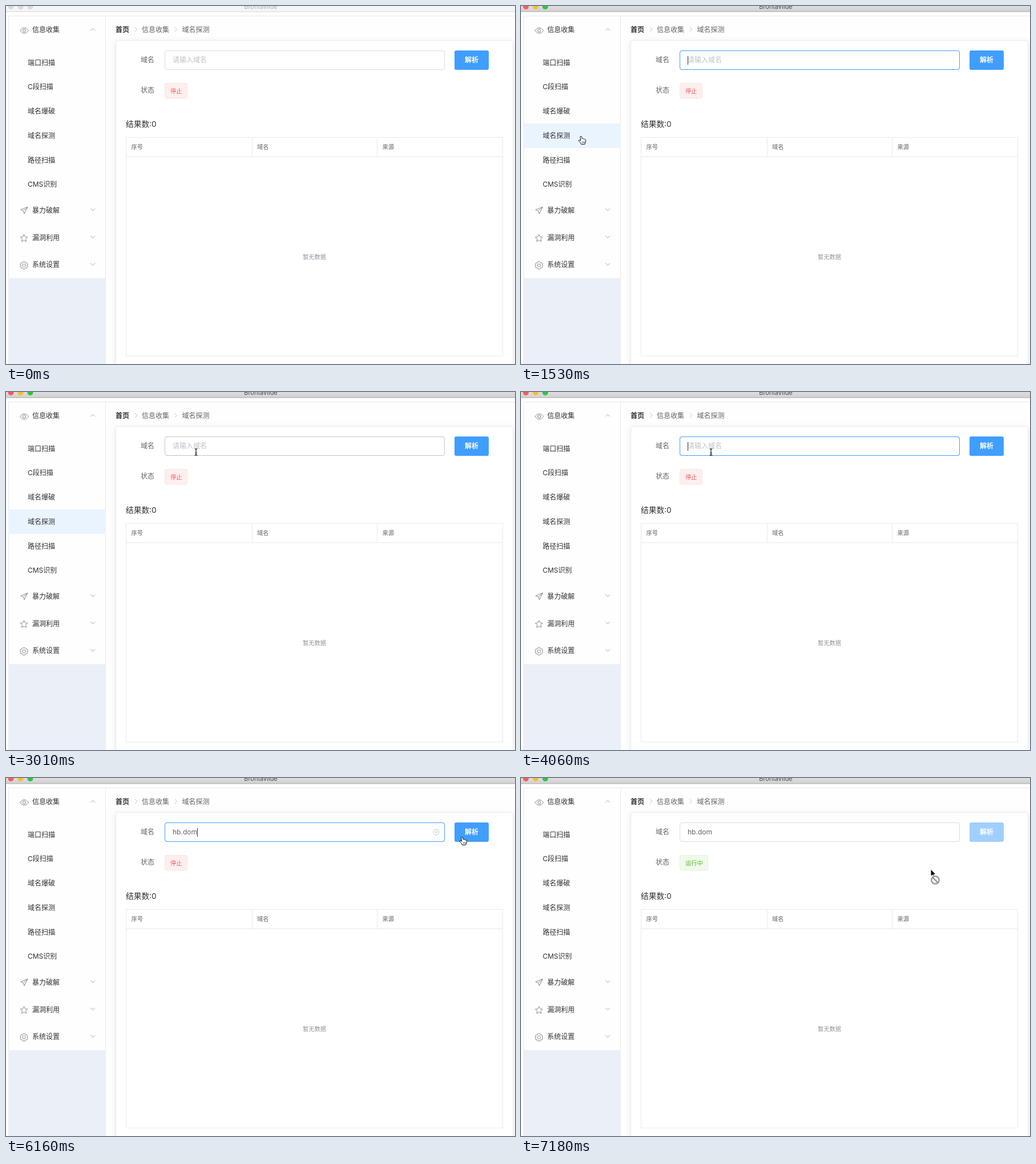
These frames come from a looping animation (892 px wide and 628 px high, 8000 ms). An HTML page:

```html
<!DOCTYPE html>
<html lang="zh-CN">
<head>
<meta charset="utf-8">
<title>域名探测</title>
<style>
html, body { margin: 0; width: 100%; height: 100%; overflow: hidden; background: #fefefe; }
svg { display: block; width: 892px; height: 628px; }
text { font: 12px Inter, "Noto Sans CJK SC", "Noto Sans CJK", sans-serif; fill: #303133; white-space: pre; }
.soft { fill: #606266; }
.bold { font-weight: 700; }
.small { font-size: 10.28px; fill: #909399; }
.mid { text-anchor: middle; }
.line { fill: none; stroke: #e6e9f0; }
.icon { fill: none; stroke: #85888e; stroke-linejoin: round; }
.chev { fill: none; stroke: #a9acb3; }
.card { fill: #fff; stroke: #e8ebf2; filter: drop-shadow(0 2px 5px rgba(0, 0, 0, .09)); }
.cursor { visibility: hidden; }
</style>
</head>
<body>
<svg viewBox="0 0 892 628">
  <defs>
    <linearGradient id="barFill" x2="0" y2="1"><stop stop-color="#dedede"/><stop offset="1" stop-color="#d0d0d0"/></linearGradient>
    <path id="arrow" d="M0 0V12.5L2.9 9.9 4.9 14.2 7 13.3 5.1 9.1H9Z" fill="#000" stroke="#fff"/>
  </defs>
  <rect width="892" height="628" fill="#fefefe"/>

  <!-- window bar -->
  <rect id="bar" width="892" height="10"/>
  <path id="barLine" d="M0 9.9H892"/>
  <g id="lights"><circle cx="8.5" cy="1" r="5"/><circle cx="25.5" cy="1" r="5"/><circle cx="42.5" cy="1" r="5"/></g>
  <text id="title" class="mid" x="446.5" y="5" style="font-size:11px">Brontavilde</text>

  <!-- side menu -->
  <path class="line" d="M4.5 478V17.5H892M174.5 17.5V478"/>
  <rect x="4" y="477.5" width="171" height="151" fill="#ebeff8"/>
  <rect id="hover" x="4" y="206" width="171" height="43" fill="#eaf4fe"/>
  <g class="icon">
    <path d="M24.5 43Q28 38 32 38T39.500 43Q36 48 32 48T24.500 43Z"/><circle cx="32" cy="43" r="2.6"/>
    <path d="M38 352.500 25.500 357.500 30.500 359.500 32 364.500ZM30.500 359.500 38 352.500"/>
    <path transform="translate(31.500 407)" d="M0-6.300 2-2.200 6.500-1.600 3.200 1.500 4 6 0 3.900-4 6-3.200 1.500-6.500-1.600-2-2.200Z"/>
    <path transform="translate(31.500 455)" d="M-2-6.300H2L3.200-4.300 5.300-4.200 6.700-1.300 5.600 0 6.700 1.300 5.300 4.200 3.200 4.300 2 6.300H-2L-3.200 4.300-5.300 4.200-6.700 1.300-5.600 0-6.700-1.300-5.300-4.200-3.200-4.300Z"/>
    <circle cx="31.500" cy="455" r="2.700"/>
  </g>
  <path class="chev" d="M148 43.200 152 39.200 156 43.200M148 355 152 359 156 355M148 403 152 407 156 403M148 451 152 455 156 451"/>
  <text x="46" y="46.300">信息收集</text>
  <text x="38" y="103.500">端口扫描</text>
  <text x="38" y="146.300">C段扫描</text>
  <text x="38" y="189">域名爆破</text>
  <text x="38" y="231.700">域名探测</text>
  <text x="38" y="274.500">路径扫描</text>
  <text x="38" y="317.300">CMS识别</text>
  <text x="46" y="362.500">暴力破解</text>
  <text x="46" y="410.500">漏洞利用</text>
  <text x="46" y="458.300">系统设置</text>

  <!-- breadcrumb -->
  <text class="bold" x="192" y="45.500">首页</text>
  <text class="soft" x="238" y="45.500">信息收集</text>
  <text class="soft" x="308.500" y="45.500">域名探测</text>
  <path class="chev" d="M226 37 230 41 226 45M295.500 37 299.500 41 295.500 45" style="stroke:#c0c4cc"/>

  <!-- form -->
  <rect class="card" x="192.500" y="60.500" width="696" height="600" rx="4"/>
  <text class="soft" x="236" y="99.300">域名</text>
  <text class="soft" x="236" y="152.300">状态</text>
  <rect id="field" x="278.500" y="78.500" width="490" height="33" rx="3.500" fill="#fff"/>
  <rect id="focus" x="278.500" y="78.500" width="490" height="33" rx="3.500" fill="none" stroke="#409eff"/>
  <text id="hint" x="292" y="99.300" style="fill:#bcc0c8">请输入域名</text>
  <text id="value" class="soft" x="292" y="99.300"></text>
  <rect id="caret" y="88" width="1" height="15" fill="#333"/>
  <path id="clear" class="chev" d="M749 95a5 5 0 1 0 10 0a5 5 0 1 0-10 0M752.200 93.200 755.800 96.800M755.800 93.200 752.200 96.800" style="stroke:#bfc3cb"/>
  <rect id="button" x="786" y="78" width="60" height="34" rx="3"/>
  <text class="bold mid" x="816" y="99.300" style="fill:#fff">解析</text>
  <rect id="tag" x="278.500" y="135.500" height="26.500" rx="3"/>
  <text id="state" class="small" x="288" y="152.500"></text>

  <!-- results -->
  <text x="210" y="212" style="font-size:13.710px">结果数:0</text>
  <path class="line" d="M210.500 230.500H870.500V614H210.500ZM210.500 264.500H870.500M431.500 230.500V264.500M650.500 230.500V264.500"/>
  <text class="small bold" x="219.500" y="251.300">序号</text>
  <text class="small bold" x="440" y="251.300">域名</text>
  <text class="small bold" x="659.500" y="251.300">来源</text>
  <text class="small mid" x="540.500" y="443.700">暂无数据</text>

  <!-- pointers, hot spot at 0,0 -->
  <use class="cursor" id="plain" href="#arrow"/>
  <g class="cursor" id="hand">
    <path d="M-1.300 1.200Q0-.8 1.300 1.200L2.200 4.800Q3.500 4 4.400 5.200 5.700 4.600 6.500 6 8.300 5.600 8.500 7.500L8 11 6.700 14.500H.5L-.8 11.800-3.800 8.400Q-4 6.600-2.300 7L-.3 8.300Z" fill="#fff" stroke="#111" stroke-linejoin="round"/>
    <path d="M2.300 9.500V12.500M4.300 9.500V12.500M6.100 9.500V12.500" stroke="#111" stroke-width=".7"/>
  </g>
  <path class="cursor" id="beam" d="M-2.500-5.500Q0-5.500 0-4 0-5.500 2.500-5.500M0-4V4.500M-2.500 6Q0 6 0 4.500 0 6 2.500 6M-1.500 2H1.500" fill="none" stroke="#111" stroke-width="1.200"/>
  <g class="cursor" id="denied">
    <use href="#arrow"/>
    <circle cx="8" cy="19" r="8.600" fill="#fff"/>
    <circle cx="8" cy="19" r="6.800" fill="#f4f4f4" stroke="#8b8b8b" stroke-width="2"/>
    <path d="M3.500 14.500 12.500 23.500" stroke="#8b8b8b" stroke-width="2"/>
  </g>
</svg>
<script>
const LOOP = 8000, STEP = 148.6, BASE = 483;
const WORD = "hb.dom";
// pointer path: time, x, y
const PATH = [
  [630, 230, 596], [1250, 112, 240], [1520, 105, 228], [1690, 105, 228],
  [2260, 300, 128], [2430, 300, 128], [3000, 333, 105], [5270, 333, 105],
  [5700, 520, 114], [6120, 799, 103], [6430, 799, 103], [7160, 718, 160]
];
const $ = id => document.getElementById(id);
const set = (id, attrs) => { for (const k in attrs) $(id).setAttribute(k, attrs[k]); };
const show = (id, on) => { $(id).style.visibility = on ? "visible" : "hidden"; };
const within = (t, a, b) => t >= a && t < b;
const ramp = (t, start, len = 220) => Math.min(1, Math.max(0, (t - start) / len));

function pointerAt(t) {
  // the pointer is only refreshed once per step
  const q = BASE + Math.floor((t - BASE) / STEP) * STEP;
  const i = PATH.findIndex(p => p[0] > q);
  if (i < 0) return PATH[PATH.length - 1].slice(1);
  const b = PATH[i], a = PATH[Math.max(0, i - 1)];
  const u = ramp(q, a[0], b[0] - a[0] || 1), k = u * u * (3 - 2 * u);
  return [a[1] + (b[1] - a[1]) * k, a[2] + (b[2] - a[2]) * k];
}

function pointerKind(t, x, y) {
  if (t < 650) return "";
  if (t >= 6600) return "denied";
  if (x < 175 && y < 477 || x >= 786 && y < 112) return "hand";
  return x > 278 && x < 769 && y < 112 ? "beam" : "plain";
}

function focusAt(t) {
  if (t < 1830) return ramp(t, 650);
  if (t < 3160) return 1 - ramp(t, 1830);
  return t < 6310 ? 1 : 1 - ramp(t, 6310);
}

function caretOn(t) {
  return within(t, 500, 950) || within(t, 1380, 1830) || within(t, 3160, 3610)
    || within(t, 4060, 5410) || within(t, 5860, 6310);
}

function draw(t) {
  const active = t >= 500, running = t >= 6600;
  set("bar", { fill: active ? "url(#barFill)" : "#f5f5f5" });
  set("barLine", { stroke: active ? "#aaa" : "#d4d4d4" });
  $("title").style.fill = active ? "#4a4a4a" : "#b0b0b0";
  ["#fc5b57", "#fdbc2e", "#28c840"].forEach((c, i) =>
    $("lights").children[i].setAttribute("fill", active ? c : "#d9d9d9"));

  const [x, y] = pointerAt(t), kind = pointerKind(t, x, y);
  for (const id of ["plain", "hand", "beam", "denied"]) {
    show(id, id === kind);
    if (id === kind) set(id, { transform: `translate(${x} ${y})` });
  }

  set("hover", { opacity: t < 3160 ? ramp(t, 1230, 290) : 0 });
  set("field", { stroke: kind === "beam" ? "#c0c4cc" : "#d9dce3" });
  set("focus", { opacity: focusAt(t) });

  const count = t < 4210 ? 0 : Math.min(WORD.length, 2 + Math.floor((t - 4210) / 150));
  $("value").textContent = WORD.slice(0, count);
  show("hint", !count);
  show("clear", within(t, 4210, 6450));
  show("caret", caretOn(t));
  set("caret", { x: 292 + (count ? Math.round($("value").getComputedTextLength()) : 0) });

  set("button", { fill: running ? "#a0cfff" : t >= 6310 ? "#66b1ff" : "#409eff" });
  set("tag", running
    ? { width: 49, fill: "#f0f9eb", stroke: "#e1f3d8" }
    : { width: 39, fill: "#feefef", stroke: "#fde2e2" });
  $("state").textContent = running ? "运行中" : "停止";
  $("state").style.fill = running ? "#57b925" : "#ee5f5d";
}

const start = performance.now();
function tick() {
  draw((performance.now() - start) % LOOP);
  requestAnimationFrame(tick);
}
tick();
</script>
</body>
</html>
```
